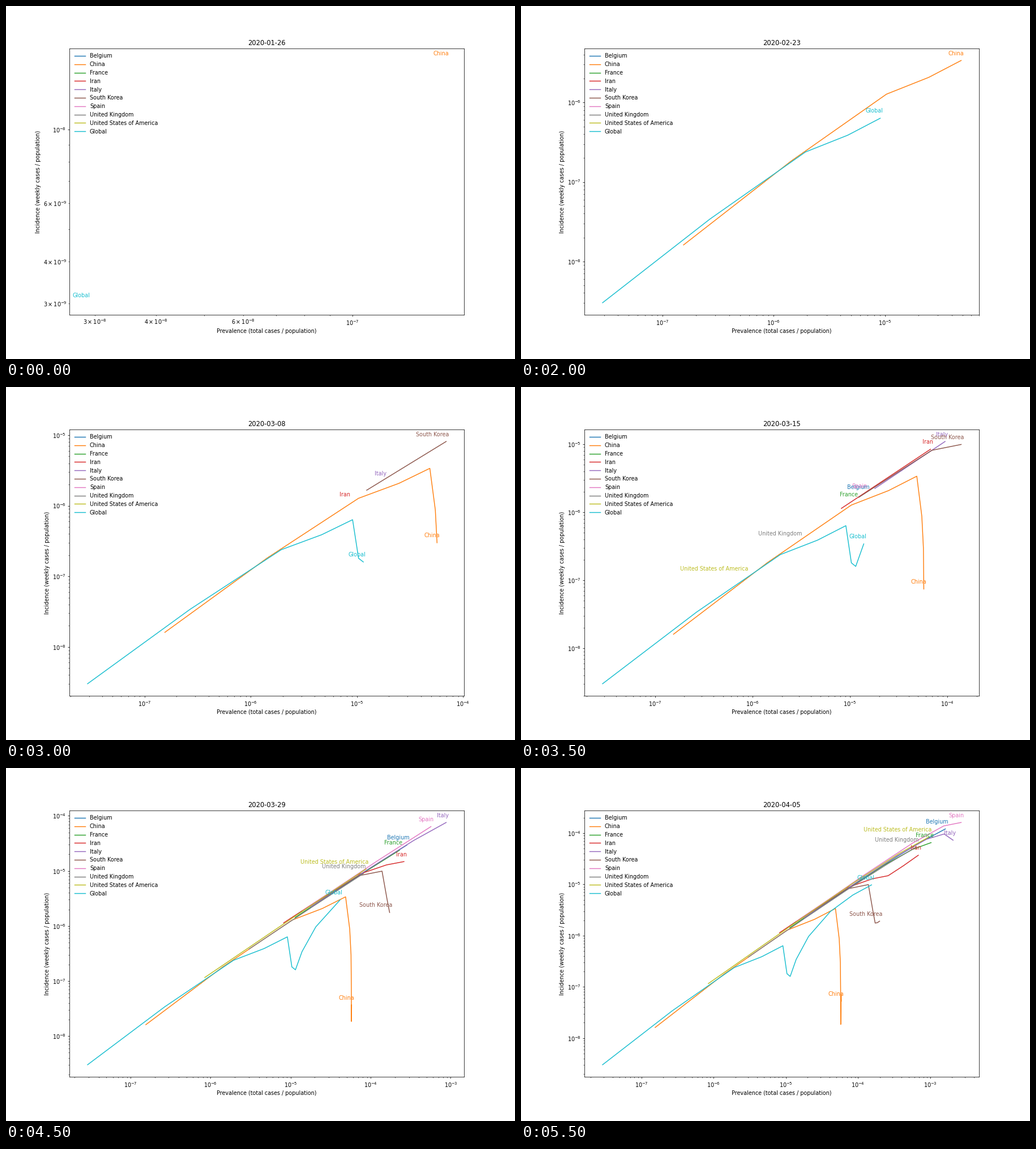
These frames come from a looping animation (899x623 px, 10 s). A matplotlib script:

```python
import numpy as np
import matplotlib.pyplot as plt
from matplotlib.animation import FuncAnimation

W, H = 899, 623
DPI = W / 13
FRAMES, INTERVAL = 20, 500
LAST = 11                        # last week with data
MIN_CASES = 150                  # smaller outbreaks stay hidden
weeks = np.arange(-1, LAST + 1)


def outbreak(total, rate, brake, delay=1):
    """Cumulative cases, traced back from the final total.

    Weekly log growth is `rate` at the end; more than `delay` weeks before
    that it rises by about `brake` per week.
    """
    back = np.arange(1, LAST + 2)
    growth = rate + brake * np.logaddexp(0, 3 * (back - delay)) / 3
    drop = np.append(0, np.cumsum(growth))
    return total * np.exp(-drop[::-1])


def wave(start, keys):
    """Cumulative cases from (week, new cases) keys, log-interpolated."""
    at, new = np.array(keys).T
    new = np.exp(np.interp(weeks[1:], at, np.log(new)))
    return np.cumsum(np.append(start, new))


CHINA_KEYS = [(0, 157), (1, 1772), (2, 12423), (4, 33000), (5, 8525),
              (6, 2917), (8, 180), (10, 705), (11, 512)]

# population in millions and cumulative cases per week
data = {
    "Belgium": (11.42, outbreak(18431, 0.67, 0.32)),
    "China": (1392.73, wave(59, CHINA_KEYS)),
    "France": (66.99, outbreak(68605, 0.5, 0.4)),
    "Iran": (81.8, outbreak(55743, 0.48, 1.6, delay=4)),
    "Italy": (60.43, outbreak(124632, 0.2, 0.365)),
    "South Korea": (51.64, outbreak(10237, 0.07, 1.1, delay=4.5)),
    "Spain": (46.72, outbreak(124736, 0.42, 0.57)),
    "United Kingdom": (66.49, outbreak(41903, 0.82, 0.33)),
    "United States of America": (327.17, outbreak(312237, 0.82, 0.6)),
}

# the rest of the world follows the listed countries
china = data["China"][1]
others = sum(cases for _, cases in data.values()) - china
spread = np.interp(weeks, [7, 9], [1.17, 1.43])
data["Global"] = (7594.27, 1.02 * china + spread * others)

plt.rcParams["font.family"] = "DejaVu Sans"
# a hair of slack keeps the pixel size from rounding down
fig, ax = plt.subplots(figsize=((W + 1e-6) / DPI, (H + 1e-6) / DPI), dpi=DPI)
fig.subplots_adjust(left=0.125, right=0.9, bottom=0.125, top=0.88)
ax.set_xscale("log")
ax.set_yscale("log")
ax.set_xlabel("Prevalence (total cases / population)")
ax.set_ylabel("Incidence (weekly cases / population)")


def make_track(name, millions, cases):
    share = cases / (millions * 1e6)
    first = np.argmax(cases[1:] > MIN_CASES)
    line, = ax.plot([], [], label=name)
    tag = ax.annotate(name, (1, 1), xytext=(5, 10), textcoords="offset points",
                      ha="right", color=line.get_color())
    return share[1:], np.diff(share) / 7, first, line, tag


tracks = [make_track(name, *entry) for name, entry in data.items()]
ax.legend(loc="upper left", frameon=False)


def update(frame):
    week = min(frame, LAST)
    for prevalence, incidence, first, line, tag in tracks:
        span = slice(first, week + 1)
        line.set_data(prevalence[span], incidence[span])
        tag.set_visible(week >= first)
        if week >= first:
            tag.xy = prevalence[week], incidence[week]
    # the last two weeks share one date
    ax.set_title(str(np.datetime64("2020-01-26") + 7 * min(week, LAST - 1)))
    ax.relim()
    ax.autoscale_view()


anim = FuncAnimation(fig, update, frames=FRAMES, interval=INTERVAL,
                     repeat=True, repeat_delay=0)
plt.show()
```
